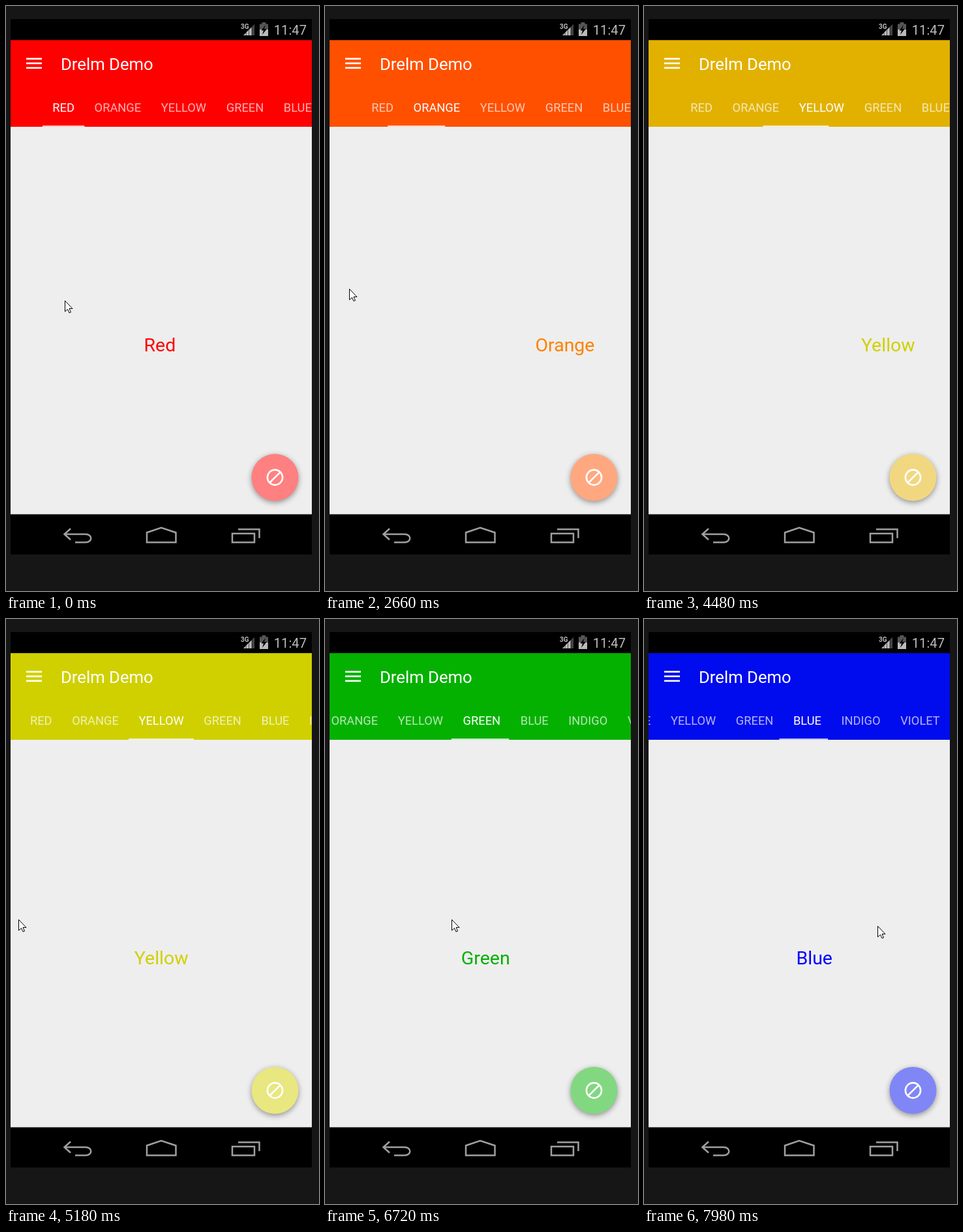
Animation, 480 px wide and 896 px high, one loop 8 s. Source, as an HTML page with a canvas:

```html
<!DOCTYPE html>
<html lang="en">
<head>
<meta charset="utf-8">
<title>Colour pager</title>
<style>
  html, body { margin: 0; width: 100%; height: 100%; overflow: hidden; background: #161616; }
  canvas { display: block; }
</style>
</head>
<body>
<canvas id="stage" width="480" height="896"></canvas>
<script>
const ctx = document.getElementById('stage').getContext('2d');
const LOOP = 8000, STEP = 70;
const LEFT = 7, WIDTH = 462, RIGHT = LEFT + WIDTH, CENTER = LEFT + WIDTH / 2;
const TAB_SIZE = 18.3, TAB_PAD = 15.3;

const names = ['Red', 'Orange', 'Yellow', 'Green', 'Blue', 'Indigo', 'Violet'];
const colors = [[255, 0, 0], [255, 128, 0], [208, 208, 0], [0, 176, 0], [0, 0, 255], [75, 0, 130], [143, 0, 255]];

// The page settles at pace `tau`; the pointer goes `reach` px left and comes back within `span` ms.
const swipes = [
  { start: 1820, tau: 776, span: 1680, reach: 365, lift: 34 },
  { start: 3640, tau: 786, span: 2310, reach: 500, lift: 0 },
  { start: 6090, tau: 396, span: 910, reach: 296, lift: 0 },
  { start: 7140, tau: 583, span: 940, reach: 334, lift: 0 }
];
// Slow pointer moves between swipes
const glides = [
  { start: 0, span: 210, dx: 40, dy: -6 },
  { start: 700, span: 700, dx: 280, dy: 29 },
  { start: 1820, span: 1680, dx: -16, dy: -14 },
  { start: 6720, span: 420, dx: 0, dy: 10 }
];
const PULL = { start: 700, grow: 770, end: 1820, fade: 210 };
const REST = .0045;

const mix = (a, b, k) => a + (b - a) * k;
const unit = v => Math.min(1, Math.max(0, v));
const ease = v => (1 - Math.cos(Math.PI * unit(v))) / 2;
const bump = v => Math.sin(Math.PI * unit(v)) ** 2;
const rgb = c => `rgb(${c.map(Math.round)})`;

function pageAt(t) {
  const rest = t < PULL.start ? REST : 0;
  return swipes.reduce((sum, s) => sum + 1 - Math.exp(-((Math.max(0, t - s.start) / s.tau) ** 3)), rest);
}

function pointerAt(t) {
  let x = 90, y = 451;
  for (const g of glides) {
    const k = ease((t - g.start) / g.span);
    x += g.dx * k;
    y += g.dy * k;
  }
  for (const s of swipes) {
    const k = bump((t - s.start) / s.span);
    x -= s.reach * k;
    y -= s.lift * k;
  }
  return [x, y];
}

const glowAt = t => ease((t - PULL.start) / PULL.grow) - ease((t - PULL.end) / PULL.fade);

function rect(color, x, y, w, h) {
  ctx.fillStyle = color;
  ctx.fillRect(x, y, w, h);
}

function setFont(size, weight = 400) {
  ctx.font = `${weight} ${size}px Roboto, sans-serif`;
}

function text(str, x, y, size, color, align = 'left', weight) {
  setFont(size, weight);
  ctx.textAlign = align;
  ctx.fillStyle = color;
  ctx.fillText(str, x, y);
}

function stroke(path, color, width) {
  ctx.strokeStyle = color;
  ctx.lineWidth = width;
  ctx.stroke(new Path2D(path));
}

function fill(path, color) {
  ctx.fillStyle = color;
  ctx.fill(new Path2D(path));
}

function clip(x, y, w, h) {
  ctx.save();
  ctx.beginPath();
  ctx.rect(x, y, w, h);
  ctx.clip();
}

// Tab borders follow from the label widths
setFont(TAB_SIZE);
const edges = [56];
for (const name of names) {
  edges.push(edges[edges.length - 1] + ctx.measureText(name.toUpperCase()).width + 2 * TAB_PAD);
}

function statusBar() {
  rect('#000', LEFT, 20, WIDTH, 820);
  text('3G', 360, 34.5, 10, '#bbb', 'left', 700);
  for (let i = 0; i < 4; i++) {
    const x = 364 + i * 4.4, y = 45 - i * 4.4;
    fill(`M${x} 45V${y}L${x + 3.9} ${y - 4}V45Z`, i < 3 ? '#bbb' : '#444');
  }
  fill('M389 27.5H392.5V25H398.5V27.5H402V36H389Z', '#555');
  rect('#bbb', 389, 36, 13, 10);
  fill('M398 29L391.5 37.5H395L393 44L400 35H396Z', '#000');
  text('11:47', 461, 44, 20.2, '#bbb', 'right');
}

function navBar() {
  const gray = '#a0a0a0';
  stroke('M99 800.5L89.5 809L99 817.5M90 809H122C133 809 133 821.5 122 821.5H106', gray, 2.5);
  stroke('M216 806.5L238 799L260.5 806.5V821.5H216Z', gray, 2.5);
  stroke('M347 808H381V821.5H347ZM356 801.5H388.5V815', gray, 2.5);
}

function header(page) {
  const i = Math.floor(page), next = i + 1;
  const k = (page - i) ** 1.42;
  const color = colors[i].map((v, c) => mix(v, colors[next][c], k));
  const from = mix(edges[i], edges[next], k);
  const to = mix(edges[next], edges[next + 1], k);
  const scroll = Math.min(edges[names.length] - RIGHT, Math.max(0, (from + to) / 2 - CENTER));

  rect(rgb(color), LEFT, 52, WIDTH, 133);
  rect('rgba(0,0,0,.25)', LEFT, 52, WIDTH, 1);
  for (let n = 0; n < 3; n++) rect('#fff', 31, 79.5 + n * 7, 24, 2.6);
  text('Drelm Demo', 84, 98, 25.7, '#fff');

  clip(LEFT, 124, WIDTH, 61);
  names.forEach((name, n) => {
    const shade = n === Math.round(i + k) ? '#fff' : 'rgba(255,255,255,.7)';
    text(name.toUpperCase(), edges[n] + TAB_PAD - scroll, 161.5, TAB_SIZE, shade);
  });
  rect('rgba(255,255,255,.75)', from - scroll, 183, to - from, 2);
  ctx.restore();
  return color;
}

function edgeGlow(amount) {
  if (amount <= 0) return;
  const r = 820, depth = 68, x = LEFT + depth * amount - r, y = 523;
  const g = ctx.createRadialGradient(x, y, r - depth, x, y, r);
  g.addColorStop(0, `rgba(255,0,20,${.24 * amount})`);
  g.addColorStop(.88, `rgba(255,0,20,${.07 * amount})`);
  g.addColorStop(1, 'rgba(255,0,20,0)');
  rect(g, LEFT, 185, depth + 12, 594);
}

function content(page, glow) {
  clip(LEFT, 185, WIDTH, 593.5);
  rect('#eee', LEFT, 185, WIDTH, 594);
  edgeGlow(glow);
  names.forEach((name, n) => {
    text(name, CENTER + (n - page) * WIDTH, 529, 28.5, rgb(colors[n]), 'center');
  });
  ctx.restore();
}

function floatingButton(color) {
  ctx.save();
  ctx.shadowColor = 'rgba(0,0,0,.4)';
  ctx.shadowBlur = 9;
  ctx.shadowOffsetY = 2.5;
  ctx.beginPath();
  ctx.arc(412.5, 722, 36, 0, 7);
  ctx.fillStyle = rgb(color.map(v => mix(v, 255, .5)));
  ctx.fill();
  ctx.restore();
  stroke('M400.9 722a11.6 11.6 0 1 0 23.2 0a11.6 11.6 0 1 0 -23.2 0M404.3 730.2L420.7 713.8', '#fff', 2.6);
}

function pointer(x, y) {
  if (x < LEFT) return;
  ctx.save();
  ctx.translate(Math.round(x) + .5, Math.round(y) + .5);
  const arrow = 'M0 0V16.5L4 13L6.5 18.5L9 17.5L6.5 12H11.5Z';
  fill(arrow, '#fff');
  stroke(arrow, '#000', 1);
  ctx.restore();
}

function draw(t) {
  const page = pageAt(t);
  rect('#161616', 0, 0, 480, 896);
  statusBar();
  navBar();
  content(page, glowAt(t));
  floatingButton(header(page));
  pointer(...pointerAt(t));
}

const start = performance.now();
function tick() {
  const t = (performance.now() - start) % LOOP;
  draw(Math.floor(t / STEP) * STEP);
  requestAnimationFrame(tick);
}
tick();
</script>
</body>
</html>
```
